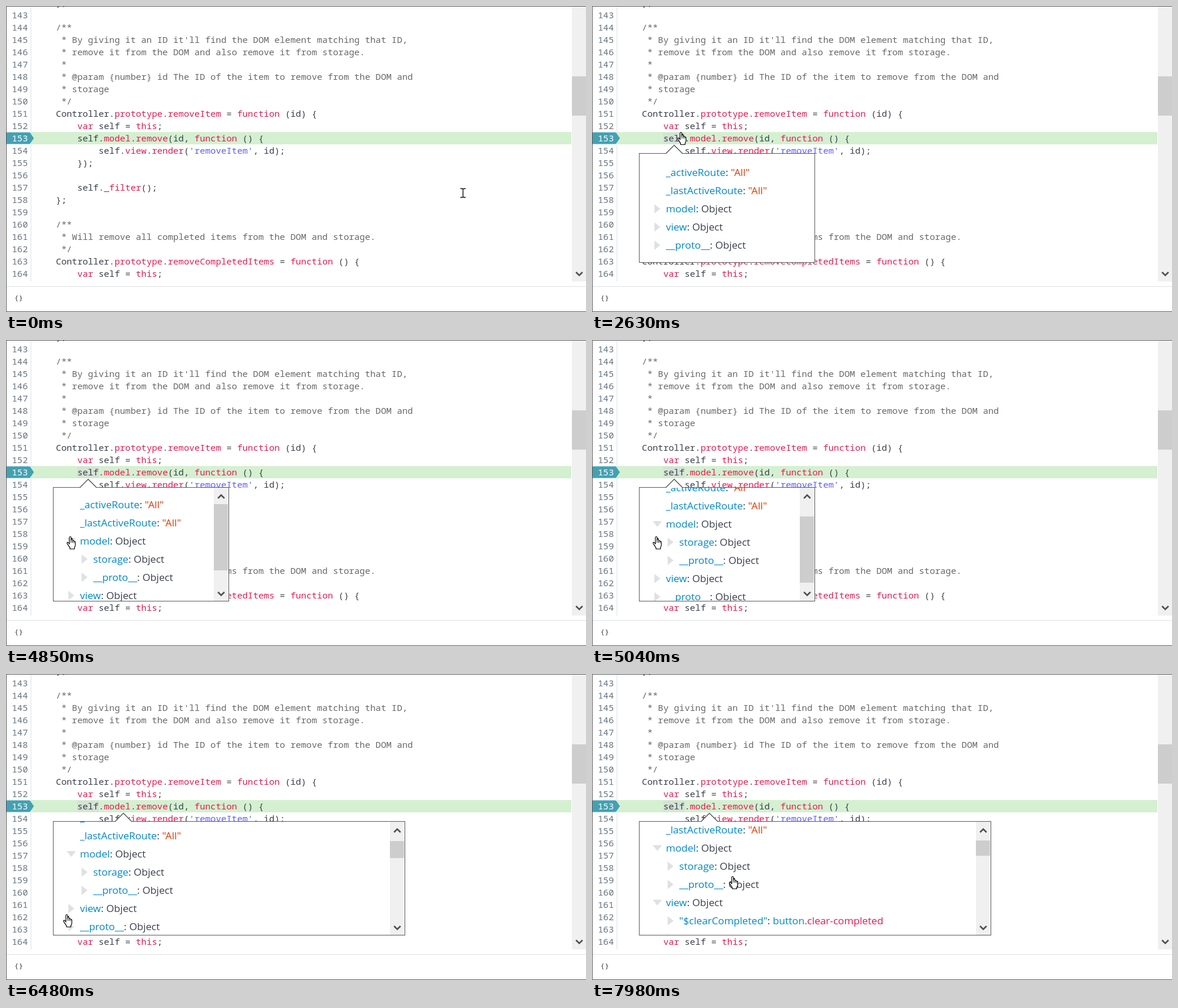
Write an HTML page that moves like this. It is 988 px wide and 522 px high and loops after 8 s.

```html
<!DOCTYPE html>
<html lang="en">
<head>
<meta charset="utf-8">
<title>Debugger variable preview</title>
<style>
  html, body { margin: 0; width: 100%; height: 100%; overflow: hidden; background: #fff; }
  svg { display: block; }
  text { white-space: pre; }
  .code { font: 15.14px "Noto Sans Mono", monospace; fill: #393f4c; }
  .number { fill: #667380; }
  .comment { fill: #686868; }
  .pink { fill: #e8194f; }
  .string { fill: #5b5fff; }
  .tree { font: 17.2px "Open Sans", sans-serif; fill: #393f4c; }
  .blue { fill: #0088cc; }
  .orange { fill: #e63900; }
  .arrow { fill: #dde1e4; }
  .track { fill: #f0f0f0; }
  .thumb { fill: #cdcdcd; }
  .chevron { fill: none; stroke: #505050; stroke-width: 2.6; }
  .outline { fill: #fff; stroke: #5a5a5c; }
</style>
</head>
<body>
<svg id="stage" width="988" height="522" viewBox="0 0 988 522">
  <clipPath id="editorClip"><rect x="1" y="1" width="986" height="469"/></clipPath>
  <clipPath id="treeClip"><rect x="81" y="252" width="598" height="193"/></clipPath>
  <path class="outline" d="M988 .5H.5V521.5H988"/>

  <g id="editor" class="code" clip-path="url(#editorClip)">
    <path d="M42.5 1V470" stroke="#dde1e4"/>
    <rect x="43" y="215" width="920" height="21" fill="#d4f0d0"/>
    <rect id="hover" x="121" y="216" width="37" height="19" fill="#d5e3d4"/>
    <path d="M1 216H40.5L47 225.5L40.5 235H1Z" fill="#44a1b2" stroke="#44a1b2" stroke-linejoin="round"/>
  </g>
  <rect id="caret" x="103" y="320" width="1" height="21"/>

  <rect class="track" x="964" y="1" width="24" height="469"/>
  <rect class="thumb" x="964" y="120" width="24" height="67"/>
  <path class="chevron" d="M971 454l5.5 5.5l5.5-5.5"/>
  <path d="M1 478.5H988" stroke="#dde1e4"/>
  <text x="15.8" y="502" font-family="Open Sans, sans-serif" font-size="11.5" fill="#222">{ }</text>

  <g id="popup">
    <rect id="frame" class="outline" x="80.5" y="251.5" width="299" height="186"/>
    <path id="pointer" class="outline" stroke-width="1.5" d="M125.5 252L140 237.5L154.5 252"/>
    <g clip-path="url(#treeClip)"><g id="tree" class="tree"></g></g>
    <g id="scrollbar">
      <rect class="track" x="354" y="252" width="24.5" height="193"/>
      <rect id="thumb" class="thumb" x="354" y="276" width="24" height="113"/>
      <path class="chevron" d="M361 270l5.5-5.5l5.5 5.5M361 430l5.5 5.5l5.5-5.5"/>
    </g>
  </g>

  <g id="beam"><path d="M-4.5-7.5H-1.5L0-6.5L1.5-7.5H4.5M0-6.5V6.5M-4.5 7.5H-1.5L0 6.5L1.5 7.5H4.5" fill="none" stroke="#000" stroke-width="1.4"/></g>
  <g id="hand"><path d="M4.5 13V2Q4.5.5 6 .5T7.5 2V7Q9-.2 10.3 7.6Q12.2 6.6 12.6 8.4Q14.6 8 14.6 10.3V15Q14.6 17.2 13 19V21.5H5.5V19.3L.9 12.6Q0 10.4 1.6 10.2Q3 10.2 4.5 13Z"
    transform="translate(.5)" fill="#fff" stroke="#000" stroke-width="1.2" stroke-linejoin="round"/>
    <path d="M8 7V11M10.5 7.6V11M13 8.6V11.5" stroke="#000" stroke-width=".9"/></g>
</svg>
<script>
const LOOP = 8000;
const byId = id => document.getElementById(id);

function add(parent, tag, attrs = {}, content = '') {
  const el = document.createElementNS('http://www.w3.org/2000/svg', tag);
  for (const key in attrs) el.setAttribute(key, attrs[key]);
  el.textContent = content;
  return parent.appendChild(el);
}

// Editor
const FIRST_LINE = 142, ROW = 21, CURRENT = 153;
const source = `    };

    /**
     * By giving it an ID it'll find the DOM element matching that ID,
     * remove it from the DOM and also remove it from storage.
     *
     * @param {number} id The ID of the item to remove from the DOM and
     * storage
     */
    Controller.prototype.removeItem = function (id) {
        var self = this;
        self.model.remove(id, function () {
            self.view.render('removeItem', id);
        });

        self._filter();
    };

    /**
     * Will remove all completed items from the DOM and storage.
     */
    Controller.prototype.removeCompletedItems = function () {
        var self = this;`.split('\n');
const token = /('[^']*'|\b(?:var|this|function)\b|(?<=\.)\w+)/;

source.forEach((line, i) => {
  const number = FIRST_LINE + i;
  const y = 231 + (number - CURRENT) * ROW;
  const label = add(byId('editor'), 'text', { x: 10, y, class: 'number' }, number);
  if (number === CURRENT) label.style.fill = '#fff';
  const text = add(byId('editor'), 'text', { x: 48.8, y });
  if (/^\s+\/?\*/.test(line)) {
    text.setAttribute('class', 'comment');
    text.textContent = line;
    return;
  }
  line.split(token).forEach((part, k) => {
    const kind = k % 2 === 0 ? '' : part[0] === "'" ? 'string' : 'pink';
    add(text, 'tspan', { class: kind }, part);
  });
});

// Object tree
const ITEM = 31;
function item(index, depth, name, parts, expandable = true) {
  const g = add(byId('tree'), 'g');
  const x = 126 + depth * 22.5, y = 284 + index * ITEM;
  const holder = add(g, 'g', { transform: `translate(${x - 14.7} ${y})` });
  if (expandable) g.arrow = add(holder, 'path', { class: 'arrow', d: 'M-5-8L5 0L-5 8Z' });
  const text = add(g, 'text', { x, y: y + 6 });
  add(text, 'tspan', { class: 'blue' }, name);
  add(text, 'tspan', {}, ': ');
  for (const [value, kind = ''] of parts) add(text, 'tspan', { class: kind }, value);
  return g;
}
const object = [['Object']];
const node = (tag, cls) => [[tag, 'blue'], ['.' + cls, 'pink']];

item(0, 0, '_activeRoute', [['"All"', 'orange']], false);
item(1, 0, '_lastActiveRoute', [['"All"', 'orange']], false);
const model = item(2, 0, 'model', object);
const modelItems = [item(3, 1, 'storage', object), item(4, 1, '__proto__', object)];
const view = item(3, 0, 'view', object);
const proto = item(4, 0, '__proto__', object);
const viewItems = [
  item(6, 1, '"$clearCompleted"', node('button', 'clear-completed')),
  item(7, 1, '"$footer"', node('footer', 'footer'))
];

// Motion: each step is [ms, value, easing to the next step]; the default holds.
const HOLD = 'steps(1, end)', LINEAR = 'linear', OUT = 'ease-out';
const at = (x, y) => `translate(${x}px, ${y}px)`;
const turn = deg => `rotate(${deg}deg)`;

function run(el, prop, steps) {
  const frames = steps.map(([ms, value, easing = HOLD]) =>
    ({ offset: ms / LOOP, [prop]: value, easing }));
  frames.push({ offset: 1, [prop]: steps.at(-1)[1] });
  el.animate(frames, { duration: LOOP, iterations: Infinity });
}
const showFrom = (el, ms) => run(el, 'opacity', [[0, 0], [ms, 1]]);

const POPUP = 1870, GROW = 4110, OPEN_MODEL = 4150, WIDEN = 6480, OPEN_VIEW = 6520;

run(byId('caret'), 'opacity', [[0, 0], [280, 1], [810, 0], [1340, 1], [POPUP, 0]]);

run(byId('beam'), 'transform', [
  [0, at(778.5, 319)],
  [700, at(778.5, 319), 'cubic-bezier(.35, .1, .75, .9)'],
  [1510, at(190.5, 277), LINEAR],
  [1540, at(176.5, 267)],
  [1575, at(172.5, 262), OUT],
  [1800, at(159.5, 218)]
]);
run(byId('beam'), 'opacity', [[0, 1], [1830, 0]]);

showFrom(byId('hand'), 1830);
run(byId('hand'), 'transform', [
  [0, at(153, 210)],
  [2630, at(145, 215)],
  [2660, at(143, 218), 'ease-in-out'],
  [3150, at(115, 351), OUT],
  [3370, at(114, 338)],
  [3450, at(112, 338)],
  [3650, at(112, 337), LINEAR],
  [3810, at(103, 335)],
  [5510, at(103, 335), LINEAR],
  [5610, at(109, 355), OUT],
  [5760, at(96, 395)],
  [5930, at(96, 396), LINEAR],
  [6020, at(97, 410)],
  [6500, at(97, 410), LINEAR],
  [6700, at(102, 403)],
  [6910, at(102, 403), LINEAR],
  [7000, at(102, 395)],
  [7420, at(102, 395), LINEAR],
  [7500, at(99, 419), OUT],
  [7720, at(233, 345)]
]);

for (const id of ['popup', 'hover']) showFrom(byId(id), POPUP);
run(byId('frame'), 'height', [[0, '186px'], [GROW, '194px']]);
run(byId('frame'), 'width', [[0, '299px'], [WIDEN, '599px']]);
run(byId('pointer'), 'transform', [[0, at(0, 0)], [WIDEN, at(60, 0)]]);

showFrom(byId('scrollbar'), GROW);
run(byId('scrollbar'), 'transform', [[0, at(0, 0)], [WIDEN, at(300, 0)]]);
run(byId('thumb'), 'y', [
  [0, '276px'], [4830, '276px', OUT], [5040, '301px'], [WIDEN, '285px'], [7480, '284px']
]);
run(byId('thumb'), 'height', [[0, '113px'], [WIDEN, '29px'], [7480, '26px']]);
run(byId('tree'), 'transform', [
  [0, at(0, 0)], [4830, at(0, 0), LINEAR], [5040, at(0, -32), OUT],
  [5210, at(0, -39)], [7980, at(0, -49)]
]);

modelItems.forEach(el => showFrom(el, OPEN_MODEL));
viewItems.forEach(el => showFrom(el, OPEN_VIEW));
run(view, 'transform', [[0, at(0, 0)], [OPEN_MODEL, at(0, 2 * ITEM)]]);
run(proto, 'transform', [[0, at(0, 0)], [OPEN_MODEL, at(0, 2 * ITEM)], [OPEN_VIEW, at(0, 30 * ITEM)]]);
run(model.arrow, 'transform', [[0, turn(0)], [OPEN_MODEL, turn(0), 'ease'], [4320, turn(90)]]);
run(view.arrow, 'transform', [[0, turn(0)], [OPEN_VIEW, turn(0), 'ease'], [6700, turn(90)]]);
</script>
</body>
</html>
```
